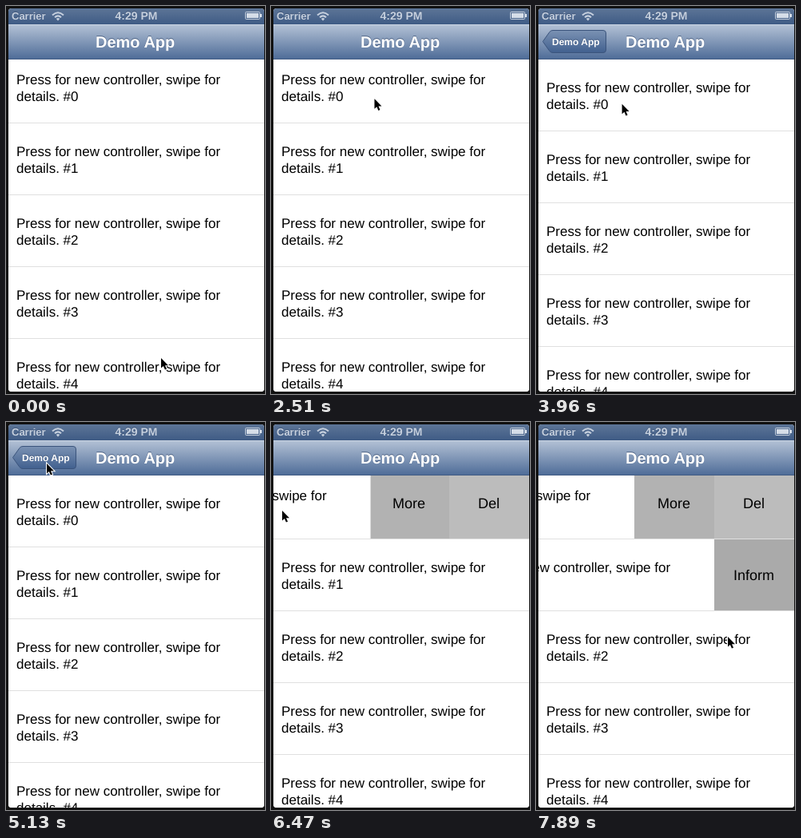
Write an HTML page that moves like this. It is 324x486 px and loops after 8000 ms.

```html
<!DOCTYPE html>
<html lang="en">
<head>
<meta charset="utf-8">
<title>Swipe list</title>
<style>
  html, body { margin: 0; width: 100%; height: 100%; overflow: hidden; background: #111; }
  svg { display: block; width: 324px; height: 486px; font-family: "Liberation Sans", Arial, sans-serif; }
  text { text-rendering: geometricPrecision; }
  .row { font-size: 17px; }
  .action { font-size: 18px; text-anchor: middle; }
  .bold { font-weight: bold; }
</style>
</head>
<body>
<svg viewBox="0 0 324 486">
  <defs>
    <clipPath id="screen"><rect x="3" y="3" width="320" height="480" rx="4"/></clipPath>
    <linearGradient id="statusFill" x2="0" y2="1">
      <stop stop-color="#5d7597"/><stop offset="1" stop-color="#3f5b85"/>
    </linearGradient>
    <linearGradient id="navFill" x2="0" y2="1">
      <stop stop-color="#b4c2d6"/><stop offset="1" stop-color="#4d6b97"/>
    </linearGradient>
    <linearGradient id="backFill" x2="0" y2="1">
      <stop stop-color="#7b92b3"/><stop offset="1" stop-color="#41608f"/>
    </linearGradient>
  </defs>
  <g clip-path="url(#screen)">
    <rect x="3" y="3" width="320" height="480" fill="#fff"/>
    <g id="rootList"></g>
    <g id="nextList"></g>
    <rect x="3" y="23" width="320" height="44" fill="url(#navFill)"/>
    <rect x="3" y="23" width="320" height="1" fill="#cdd7e4"/>
    <rect x="3" y="66" width="320" height="1" fill="#415b84"/>
    <g id="backButton">
      <path d="M8.500 44.500 17 32.500Q18.600 30.500 21 30.500H84Q87.500 30.500 87.500 34V55Q87.500 58.500 84 58.500H21Q18.600 58.500 17 56.500Z"
            fill="url(#backFill)" stroke="#3b547c"/>
    </g>
    <g id="rootTitle"></g>
    <g id="nextTitle"></g>
    <rect x="3" y="3" width="320" height="20" fill="url(#statusFill)"/>
    <g id="status">
      <g fill="none" stroke="#c6d0de" stroke-width="2">
        <path d="M58 11.500Q65 5 72 11.500M61 14.200Q65 10.600 69 14.200"/>
        <path d="M65 18.500 62.800 16Q65 14.200 67.200 16Z" fill="#c6d0de" stroke="none"/>
        <rect x="299.500" y="7.500" width="18" height="9" rx="1" stroke-width="1"/>
      </g>
      <path d="M301 9H316V15H301ZM318 10H320V14H318Z" fill="#d5dde8"/>
    </g>
  </g>
  <path id="cursor" d="M0 0V12.500L2.900 9.900 4.900 14.600 7 13.700 5 9.200H9Z"
        fill="#000" stroke="#fff" stroke-width="2" paint-order="stroke"/>
</svg>
<script>
const LOOP = 8000, STEP = 90, PHASE = 150;
const byId = id => document.getElementById(id);

function add(parent, tag, attrs, text = "") {
  const node = document.createElementNS("http://www.w3.org/2000/svg", tag);
  for (const name in attrs) node.setAttribute(name, attrs[name]);
  node.textContent = text;
  return parent.appendChild(node);
}

// Bold text with a dark edge one pixel above it.
function embossed(id, text, x, y, size, fill = "#fff") {
  const attrs = { x, class: "bold", "font-size": size };
  add(byId(id), "text", { ...attrs, y: y - 1, fill: "#33496c", "fill-opacity": 0.7 }, text);
  add(byId(id), "text", { ...attrs, y, fill }, text);
}

// Builds the rows and returns the sliding cover of each one.
function buildList(list, top, actions = {}) {
  return Array.from({ length: 5 }, (_, i) => {
    const y = top + i * 90;
    for (const [label, x, fill] of actions[i] || []) {
      add(list, "rect", { x, y, width: 100, height: 89, fill });
      add(list, "text", { x: x + 49.5, y: y + 51, class: "action" }, label);
    }
    const cover = add(list, "g", { class: "row" });
    add(cover, "rect", { x: 3, y, width: 320, height: 89, fill: "#fff" });
    add(cover, "text", { x: 13, y: y + 41 }, "Press for new controller, swipe for");
    add(cover, "text", { x: 13, y: y + 62 }, "details. #" + i);
    add(list, "rect", { x: 3, y: y + 89, width: 320, height: 1, fill: "#e0e0e0" });
    return cover;
  });
}

const covers = buildList(byId("rootList"), 57, {
  0: [["More", 123, "#b2b2b2"], ["Del", 223, "#bcbcbc"]],
  1: [["Inform", 223, "#aaaaaa"]]
});
buildList(byId("nextList"), 67);

embossed("rootTitle", "Demo App", 112, 52, 20);
embossed("nextTitle", "Demo App", 112, 52, 20);
embossed("backButton", "Demo App", 20, 49, 12);
embossed("status", "Carrier", 7, 17, 13, "#c6d0de");
embossed("status", "4:29 PM", 136.5, 17, 14, "#c6d0de");

// Pointer glides: start, end, target x, target y
const glides = [
  [80, 350, 149, 390],
  [1070, 1420, 101, 300],
  [1420, 1950, 253, 123],
  [2040, 2560, 123, 116],
  [2800, 3120, 249, 116],
  [3640, 3960, 104, 123],
  [4230, 5100, 51, 52],
  [5390, 5950, 255, 90],
  [6020, 6450, 14, 111],
  [6470, 6820, 255, 163],
  [6910, 7270, 90, 180],
  [7270, 7630, 206, 220],
  [7640, 7890, 240, 269]
];

function ease(t, start, end) {
  const p = Math.min(1, Math.max(0, (t - start) / (end - start)));
  return p * p * (3 - 2 * p);
}

function pointerAt(t) {
  let x = 194, y = 441;
  for (const [start, end, toX, toY] of glides) {
    const p = ease(t, start, end);
    x += (toX - x) * p;
    y += (toY - y) * p;
  }
  return [x, y];
}

function place(node, x, y = 0, opacity = 1) {
  node.setAttribute("transform", `translate(${x} ${y})`);
  node.setAttribute("opacity", opacity);
}

function draw(now) {
  const time = now % LOOP;
  const t = Math.max(0, Math.floor((time - PHASE) / STEP) * STEP + PHASE);
  const pushed = ease(t, 2867, 3217) - ease(t, 5313, 5663);
  const rest = 1 - pushed;

  place(byId("rootList"), -320 * pushed);
  place(byId("nextList"), 320 * rest);
  place(byId("rootTitle"), -210 * pushed, 0, rest);
  place(byId("nextTitle"), 213 * rest, 0, pushed);
  place(byId("backButton"), 96 * rest, 0, pushed);
  place(covers[0], -200 * ease(t, 6080, 6470));
  place(covers[1], -100 * ease(t, 6910, 7300));
  place(byId("cursor"), ...pointerAt(t));
}

const began = performance.now();
function loop() {
  draw(performance.now() - began);
  requestAnimationFrame(loop);
}
loop();
</script>
</body>
</html>
```
